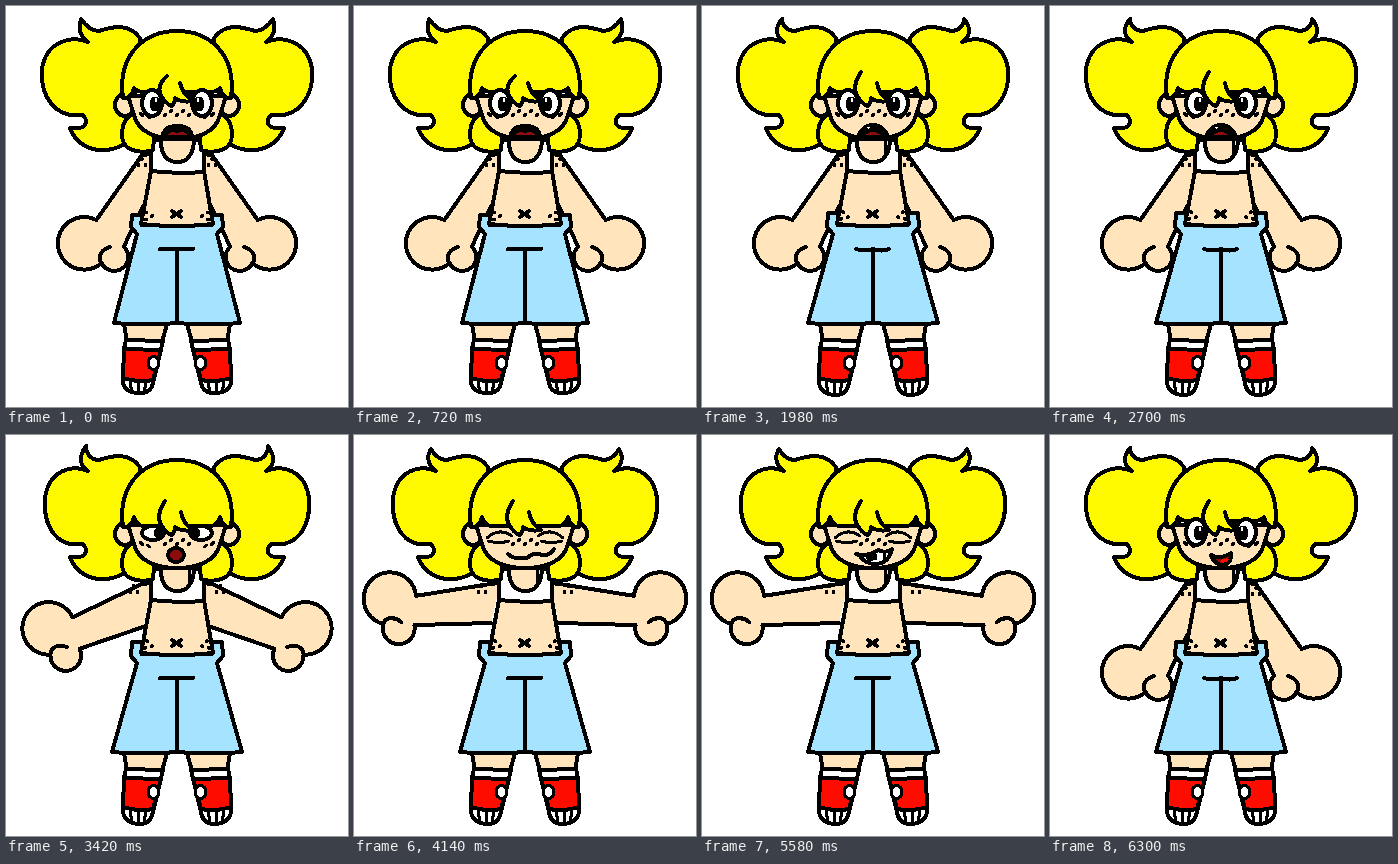
An HTML page that plays this animation: 342x401 px, repeating every 6.48 s.

```html
<!DOCTYPE html>
<html lang="en">
<head>
<meta charset="utf-8">
<title>Pigtail girl</title>
<style>
  html, body { margin: 0; width: 100%; height: 100%; overflow: hidden; background: #fff; }
  svg { display: block; width: 342px; height: 401px; }
  svg * { shape-rendering: crispEdges; }
</style>
</head>
<body>
<svg id="stage" viewBox="0 0 342 401" fill="none" stroke="#000" stroke-width="4"
     stroke-linecap="round" stroke-linejoin="round"></svg>
<script>
const STEP = 180, STEPS = 36;
const SKIN = '#ffe4bc', HAIR = '#fff900', BLUE = '#a6e3ff', RED = '#ff0c00', MAROON = '#8c0c0c';

const path = (d, fill = 'none', width = 4) => `<path d="${d}" fill="${fill}" stroke-width="${width}"/>`;
const oval = (x, y, rx, ry, fill, width = 4) =>
  `<ellipse cx="${x}" cy="${y}" rx="${rx}" ry="${ry}" fill="${fill}" stroke-width="${width}"/>`;
const repeat = (n, make) => Array.from({ length: n }, (_, i) => make(i)).join('');
const dot = (x, y) => oval(x, y, 2, 2, '#000', 0);
const mirror = s => `<g transform="matrix(-1 0 0 1 342 0)">${s}</g>`;
const both = s => s + mirror(s);
const clamp = (v, lo, hi) => Math.max(lo, Math.min(hi, v));

// Three dots around a centre
const cluster = (x, y, turn) =>
  repeat(3, i => dot(x + 4 * Math.cos(turn + i * 2.1), y + 4 * Math.sin(turn + i * 2.1)));

// The arm turns about the shoulder; drop runs from 0 (held out) to 1 (hanging)
function arm(drop) {
  const a = (4.5 + 56.5 * drop) * Math.PI / 180, cos = Math.cos(a), sin = Math.sin(a);
  const at = (u, v) => `${137 - u * cos - v * sin} ${169 + u * sin - v * cos}`;
  const hand = (u, v) => at(u - 12 * drop, v + 5 * drop);
  const thumb = 16 - 2 * drop;
  return path(`M146 148L136 149L${hand(74, 14)}A26.3 26.3 0 1 0 ${hand(109, -11.5)}
    A${thumb} ${thumb} 0 1 0 ${at(78 - 6 * drop, -15 - 3 * drop)}L137 ${188 + 12 * drop}`, SKIN)
    + path(`M${hand(109, -11.5)}C${hand(106, -4)} ${hand(97, -5)} ${hand(91, -11)}`);
}

function pigtail(tipX, tipY, left) {
  return path(`M134 32C122 16 106 21 93 25C86 25 80 20 ${tipX} ${tipY}C72 22 74 31 82 36
    C66 29 ${left + 4} 35 ${left} 63C${left - 2} 91 50 113 77 109
    C84 117 79 124 64 122C72 143 95 150 117 139L130 85Z`, HAIR);
}

function leg(odd) {
  const y = odd ? 389 : 387;
  return path('M118 318L121 336H156L161 318Z', SKIN)
    + path(`M120 334L157 335L147 377Q145 ${y} 134 ${y}Q119 ${y} 117 377L118 343Z`, '#fff')
    + path('M118 343L155 344L147 374Q132 377 117 372Z', RED)
    + path('M124 376L126 387M132 377V388M140 376L138 387', 'none', 3)
    + oval(147.5, 357, 5.5, 6.5, '#fff', 3);
}

function shorts(odd, curved) {
  const l = odd ? 106 : 108, top = odd ? 207 : 209, sag = curved ? 246 : 243;
  return both(path(`M171 317Q138 320 ${l} 317L131 228L125 221L126 ${top}H136V219H171`, BLUE))
    + path('M171 221V316', BLUE, 0) + path('M171 243V316')
    + path(`M154 243Q162 ${sag} 171 243Q180 ${sag} 187 243`);
}

function torso(odd, raised) {
  return path('M146 140L145 165L135 218Q171 222 207 218L198 165L196 140Z', SKIN)
    + path('M145 134V165Q170 168 198 166V134Z', '#fff')
    + path('M155 133Q154 148 163 154Q171 158 180 154Q188 147 188 133Z', SKIN)
    + (odd ? path('M183 133V151', 'none', 3) : '')
    + path('M166 205L175 211M175 205L166 211')
    + both(cluster(142, 210, odd ? 0.3 : 0) + cluster(raised ? 128 : 136, raised ? 155 : 157, 0.5));
}

// Gaze: open, side or shut
function eyes(gaze) {
  const lash = path('M134 107L137 110M141 110L144 112', 'none', 3);
  if (gaze === 'shut') return both(path('M133 103Q145 92 158 101M134 106Q145 109 155 106', 'none', 3));
  if (gaze === 'side') return both(oval(147, 98, 11, 7, '#fff') + oval(153, 98, 5, 5, '#000', 1) + lash);
  return both(oval(146, 97, 10, 13, '#fff') + oval(149, 98, 5, 7, '#000', 1)
    + oval(150, 94, 1.2, 1.8, '#fff', 0) + lash);
}

const MOUTHS = {
  wide: path('M155 133Q159 120 165 121Q171 118 178 121Q184 121 187 132Z', '#000')
    + path('M161 129Q166 123 171 127Q177 123 182 129Z', MAROON, 1),
  mid: path('M155 132Q161 119 171 119Q181 119 187 132Z', '#000')
    + path('M162 129Q171 122 180 129Z', MAROON, 1) + path('M164 121L167 125L169 120Z', '#fff', 1),
  oh: oval(170, 120, 8, 7, MAROON),
  smile: path('M161 120Q170 125 181 118Q182 129 172 130Q164 129 161 120Z', MAROON)
    + path('M169 127Q174 122 179 124Q177 129 169 127Z', RED, 0),
  cat: path('M154 119Q160 125 173 123Q181 116 188 120Q196 121 200 114'),
  grin: path('M154 119Q166 122 176 115Q184 119 190 114Q187 128 174 129Q163 129 158 121Z', '#fff')
    + path('M164 122L174 119L175 124L166 126Z', '#000', 1) + path('M182 117V126', 'none', 3)
};

function head(odd, gaze, mouth) {
  const hem = gaze === 'open' ? 86 : 91, sway = odd ? 2 : 0;
  return both(oval(119, 99, 10, 11, SKIN))
    + path('M122 90L128 109C132 126 150 133 171 133C192 133 210 126 214 109L220 90Z', SKIN)
    + path(`M117 92C111 48 139 25 171 25C203 25 231 48 225 92Q217 93 214 82Q211 ${hem} 204 ${hem}
      H138Q131 ${hem} 128 82Q125 93 117 92Z`, HAIR)
    + eyes(gaze)
    + path(`M${161 - sway} ${70 - sway * 2}Q149 81 156 91Q160 98 166 100Q169 97 169 92
      Q176 97 187 95Q177 89 ${174 + sway / 2} 77`, HAIR)
    + repeat(5, i => dot(159 + 6 * i, i % 2 ? 105 : 109))
    + MOUTHS[mouth];
}

// Arms rise over three steps, stay out, and come down over three
function draw(s) {
  const odd = s % 2 === 1, lift = clamp(Math.min(s - 17, 35 - s), 0, 3) / 3;
  const rising = s === 18 || s === 19, out = lift === 1, raised = lift > 0.5;
  const gaze = out ? 'shut' : rising ? 'side' : 'open';
  const mouth = out ? (s < 27 ? 'cat' : 'grin') : rising ? 'oh' : s > 19 ? 'smile' : odd ? 'mid' : 'wide';
  const tipX = out ? 77 : odd ? 80 : 75, tipY = out ? 14 : rising && raised ? 11 : 13;
  const lobe = path('M126 108C113 116 113 138 124 143Q135 148 147 144L149 122Z', HAIR);
  return both(pigtail(tipX, tipY, raised ? 39 : 36) + arm(1 - lift) + leg(odd))
    + shorts(odd, odd && !raised) + torso(odd, raised) + both(lobe) + head(odd, gaze, mouth);
}

const stage = document.getElementById('stage');
const start = performance.now();
let shown = -1;

function tick() {
  const s = Math.floor((performance.now() - start) / STEP) % STEPS;
  if (s !== shown) stage.innerHTML = draw(shown = s);
  requestAnimationFrame(tick);
}
tick();
</script>
</body>
</html>
```
